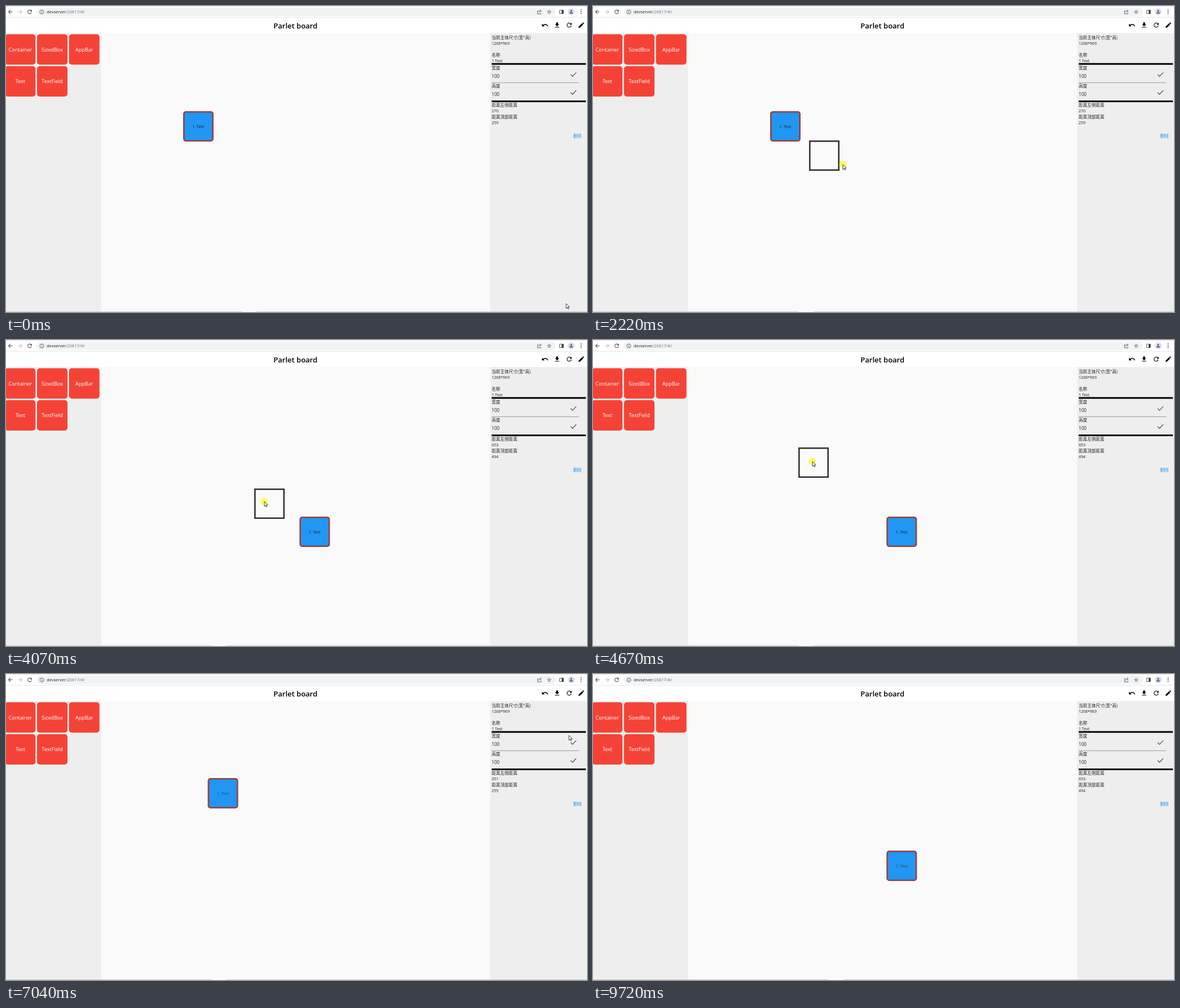
Write an HTML page that moves like this. It is 1030x544 px and loops after 9.85 s.

```html
<!DOCTYPE html>
<html lang="zh">
<head>
<meta charset="utf-8">
<title>Board editor</title>
<style>
html, body { margin: 0; width: 100%; height: 100%; overflow: hidden; background: #fafafa; }
svg { display: block; }
text { font-family: "Open Sans", "Noto Sans", "Noto Sans CJK SC", "Noto Sans CJK", sans-serif; }
.mid { text-anchor: middle; }
.line { fill: none; stroke: #5f6368; stroke-width: 1; }
#side text { font-size: 7px; fill: #222; }
#side .cjk { font-family: "Noto Sans CJK SC", "Noto Sans CJK", sans-serif; font-size: 7.6px; }
#side .field { font-size: 8.1px; }
#arrow, #hand { fill: #fff; stroke: #111; stroke-width: .8; stroke-linejoin: round; }
</style>
</head>
<body>
<svg width="1030" height="544" viewBox="0 0 1030 544">
  <path fill="#fafafa" d="M0 0H1030V544H0z"/>
  <path fill="#fff" d="M0 20H1030V48H0z"/>
  <circle id="hover" cx="955.5" cy="35" r="18.5" fill="#ebebeb"/>
  <path fill="#fff" d="M0 0H1030V20.5H0z"/>
  <path fill="#dcdcdc" d="M0 0H1030V.8H0zM0 19.8H1030V20.6H0z"/>
  <rect x="54" y="3" width="921" height="15" rx="7.5" fill="#f1f3f4"/>
  <path fill="#eee" d="M0 48H168.500V544H0zM858.500 48H1030V544H858.500z"/>

  <g id="icons"></g>
  <circle class="line" cx="63.500" cy="10.500" r="3.600"/>
  <path class="line" d="M63.500 10v2.500M63.500 8.200v1"/>
  <path class="line" d="M944.500 8.500h-2.200v5.500h6v-2M944.500 11.500q.5-3 4-3M946.800 6.500l2.200 2-2.200 2"/>
  <path class="line" d="M981.500 7.300h6.500v6.200h-6.500z"/>
  <path fill="#444" d="M985 7h3.500v7H985zM1018.700 6h1.600v1.600h-1.600zM1018.700 9.300h1.600v1.600h-1.600zM1018.700 12.600h1.600v1.600h-1.600z"/>
  <text x="72" y="13.200" font-size="7.500" fill="#222">devserver:<tspan fill="#70757a">20817/#/</tspan></text>
  <text class="mid" x="513.200" y="39.700" font-size="13" font-weight="600" fill="#000">Parlet board</text>

  <g id="cards"></g>
  <g id="side">
    <path d="M861 101.500H1028V104.400H861zM861 168H1028V171H861z"/>
    <path stroke="#999" d="M861 136.300H1016"/>
    <path fill="none" stroke="#555" stroke-width="1.300" d="M1001 121.800l3.300 3.300 6.700-7M1001 153.700l3.300 3.300 6.700-7"/>
  </g>
  <path fill="#c8c8c8" d="M0 543H1030V544H0z"/>
  <rect id="gap" y="543" width="26" height="1" fill="#fafafa"/>

  <g id="block">
    <rect x="1.300" y="1.300" width="51.400" height="51.400" rx="3.500" fill="#2196f3" stroke="#a13d38" stroke-width="2.600"/>
    <text id="label" class="mid" x="26.700" y="30" font-size="7">1. Text</text>
  </g>
  <rect id="ghost" x="1.300" y="1.300" width="51.400" height="51.400" fill="none" stroke="#333" stroke-width="2.600"/>
  <g id="pointer">
    <circle id="press" r="6.700" fill="#ff0" opacity=".6"/>
    <path id="arrow" d="M0 0v8.500l2-1.800 1.400 3 1.300-.6-1.400-2.900h2.700z"/>
    <path id="hand" d="M-1 1v6l-1.500-1.500q-1.500 0-1 1L0 11.500h4.500l1-3V5q0-1-1.200-1L1 3.400V1Q0-.6-1 1z"/>
  </g>
</svg>
<script>
const LOOP = 9850, TICK = 66.55;
const $ = id => document.getElementById(id);

function add(parent, tag, attrs, text = '') {
  const el = document.createElementNS('http://www.w3.org/2000/svg', tag);
  for (const key in attrs) el.setAttribute(key, attrs[key]);
  el.textContent = text;
  return $(parent).appendChild(el);
}

// Icons on a 24 unit grid, centred at x, y
function icon(x, y, scale, fill, d) {
  add('icons', 'path', { d, fill, transform: `translate(${x} ${y}) scale(${scale}) translate(-12 -12)` });
}
const back = 'M20 11H7.83l5.59-5.59L12 4l-8 8 8 8 1.41-1.41L7.83 13H20v-2z';
const reload = 'M17.65 6.35C16.2 4.9 14.21 4 12 4c-4.42 0-7.99 3.58-7.99 8s3.57 8 7.99 8c3.73 0 6.84-2.55 7.73-6h-2.08c-.82 2.33-3.04 4-5.65 4-3.31 0-6-2.69-6-6s2.69-6 6-6c1.66 0 3.14.69 4.22 1.78L13 11h7V4l-2.35 2.35z';
icon(7.7, 10.3, .48, '#444', back);
icon(25, 10.3, -.48, '#bbb', back);
icon(42, 10.3, .48, '#444', reload);
icon(963, 10.3, .38, '#444', 'M22 9.24l-7.19-.62L12 2 9.19 8.63 2 9.24l5.46 4.73L5.82 21 12 17.27 18.18 21l-1.63-7.03L22 9.24zM12 15.4l-3.76 2.27 1-4.28-3.32-2.88 4.38-.38L12 6.1l1.71 4.04 4.38.38-3.32 2.88 1 4.28L12 15.4z');
add('icons', 'circle', { cx: 1002, cy: 10.3, r: 6, fill: '#d5dcea' });
icon(1002, 10.3, .38, '#46546e', 'M12 12c2.21 0 4-1.79 4-4s-1.79-4-4-4-4 1.79-4 4 1.79 4 4 4zm0 2c-2.67 0-8 1.34-8 4v2h16v-2c0-2.66-5.33-4-8-4z');
icon(955.5, 34.2, .54, '#000', 'M12.5 8c-2.65 0-5.05.99-6.9 2.6L2 7v9h9l-3.62-3.62c1.39-1.16 3.16-1.88 5.12-1.88 3.54 0 6.55 2.31 7.6 5.5l2.37-.78C21.08 11.03 17.15 8 12.5 8z');
icon(977, 34, .54, '#000', 'M19 9h-4V3H9v6H5l7 7 7-7zM5 18v2h14v-2H5z');
icon(998.5, 34, .54, '#000', reload);
icon(1020, 34, .54, '#000', 'M3 17.25V21h3.75L17.81 9.94l-3.75-3.75L3 17.25zM20.71 7.04c.39-.39.39-1.02 0-1.41l-2.34-2.34c-.39-.39-1.02-.39-1.41 0l-1.83 1.83 3.75 3.75 1.83-1.83z');

['Container', 'SizedBox', 'AppBar', 'Text', 'TextField'].forEach((name, i) => {
  const x = -1.7 + i % 3 * 56.7, y = 50.3 + Math.floor(i / 3) * 56.7;
  add('cards', 'rect', { x, y, width: 54, height: 54, rx: 5, fill: '#f44336' });
  add('cards', 'text', { class: 'mid', x: x + 27, y: y + 30.4, 'font-size': 9.1, fill: '#fff' }, name);
});

const sideText = (y, text, cls = '') => add('side', 'text', { x: 861, y, class: cls }, text);
sideText(58.7, '当前主体尺寸(宽*高)', 'cjk');
sideText(68.5, '1268*969');
sideText(89.7, '名称', 'cjk');
sideText(99.7, '1 Text');
sideText(112.8, '宽度', 'cjk');
sideText(128, '100', 'field');
sideText(144.8, '高度', 'cjk');
sideText(159.8, '100', 'field');
sideText(179, '距离左侧距离', 'cjk');
const leftValue = sideText(189.4, '');
sideText(199.8, '距离顶部距离', 'cjk');
const topValue = sideText(210, '');
add('side', 'text', { x: 1005.5, y: 233.8, class: 'cjk', style: 'fill:#2196f3' }, '删除');

// Pointer path: tick, x, y, 1 = eased arrival
const path = [
  [0, 993, 529], [2, 784, 372], [4, 784, 372], [6, 805, 351], [9, 805, 351],
  [24, 343, 232, 1], [27, 343, 232], [28, 346, 232], [29, 364, 233], [32, 411, 283],
  [33, 443, 282], [38, 548, 358, 1], [43, 548, 358], [49, 546, 344, 1], [57, 546, 344],
  [60, 466, 294], [61, 458, 287], [69, 390, 221, 1], [70, 389, 216], [71, 384, 215],
  [75, 384, 215], [90, 1013, 230, 1], [98, 1013, 230], [102, 1018, 180], [106, 998, 109],
  [113, 955, 37, 1], [119, 955, 37], [126, 895, 143, 1], [128, 895, 143], [136, 1006, 530, 1],
  [149, 1006, 530]
];
function pointerAt(tick) {
  const i = path.findIndex(p => p[0] > tick);
  if (i < 0) return path[path.length - 1].slice(1);
  const [t0, x0, y0] = path[i - 1], [t1, x1, y1, eased] = path[i];
  let k = (tick - t0) / (t1 - t0);
  if (eased) k = k * k * (3 - 2 * k);
  return [x0 + (x1 - x0) * k, y0 + (y1 - y0) * k];
}

const home = { x: 314, y: 187, left: 270, top: 259 };
const low = { x: 520.3, y: 314, left: 653, top: 494 };
const high = { x: 357.6, y: 185, left: 351, top: 255 };

const within = (t, from, to) => t >= from && t < to;
const show = (id, on) => $(id).style.display = on ? '' : 'none';
const move = (id, x, y) => $(id).setAttribute('transform', `translate(${x} ${y})`);

function draw(t) {
  const [x, y] = pointerAt(t);
  const place = t < 44 ? home : within(t, 76, 116) ? high : low;
  move('block', place.x, place.y);
  $('label').setAttribute('fill', t < 76 ? '#17242f' : '#3c4650');
  leftValue.textContent = place.left;
  topValue.textContent = place.top;

  // The dragged outline trails the pointer by one tick
  const first = within(t, 30, 44), second = within(t, 58, 76);
  show('ghost', first || second);
  const [gx, gy] = pointerAt(Math.max(0, t - 1));
  move('ghost', gx - (first ? 28 : 26), gy - (first ? 44 : 30));

  const onUndo = within(t, 113, 120), hand = onUndo || within(t, 90, 99);
  move('pointer', x, y);
  show('pointer', t < 137);
  show('press', within(t, 25, 44) || within(t, 57, 76) || within(t, 114, 117));
  show('hand', hand);
  show('arrow', !hand);
  show('hover', onUndo);
  $('gap').setAttribute('x', within(t, 26, 145) ? 365 : 418);
}

const start = performance.now();
function frame() {
  draw(Math.floor((performance.now() - start) % LOOP / TICK + .3));
  requestAnimationFrame(frame);
}
frame();
</script>
</body>
</html>
```
